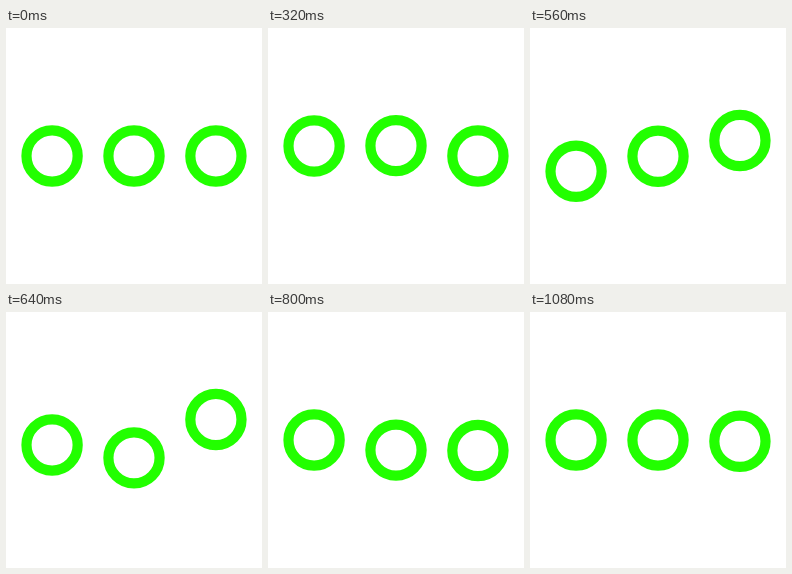
An HTML page with a canvas for the animation above (1120 ms loop, 256 by 256 pixels).

```html
<!DOCTYPE html>
<html lang="en">
<head>
<meta charset="utf-8">
<title>Ring wave</title>
<style>
  html, body { margin: 0; width: 100%; height: 100%; overflow: hidden; background: #fff; }
  canvas { display: block; width: 256px; height: 256px; }
</style>
</head>
<body>
<canvas id="stage" width="256" height="256"></canvas>
<script>
const ctx = document.getElementById('stage').getContext('2d');
const LOOP = 1120, DELAY = 200, LEG = 240;
const UNIT = 2.56;
const RING_X = [18, 50, 82];
const LIFT = [0, -8, 8, 0];

const ease = x => (1 - Math.cos(Math.PI * x)) / 2;

// Vertical offset: rest, up, down, rest in three equal eased legs.
function offset(t) {
  if (t <= 0 || t >= 3 * LEG) return 0;
  const leg = Math.floor(t / LEG);
  const from = LIFT[leg], to = LIFT[leg + 1];
  return from + (to - from) * ease(t / LEG - leg);
}

function draw(t) {
  ctx.setTransform(1, 0, 0, 1, 0, 0);
  ctx.fillStyle = '#fff';
  ctx.fillRect(0, 0, 256, 256);
  ctx.scale(UNIT, UNIT);
  ctx.strokeStyle = '#22ff00';
  ctx.lineWidth = 4;
  RING_X.forEach((x, i) => {
    ctx.beginPath();
    ctx.arc(x, 50 + offset(t - i * DELAY), 10, 0, Math.PI * 2);
    ctx.stroke();
  });
}

const start = performance.now();
function tick() {
  draw((performance.now() - start) % LOOP);
  requestAnimationFrame(tick);
}
tick();
</script>
</body>
</html>
```
